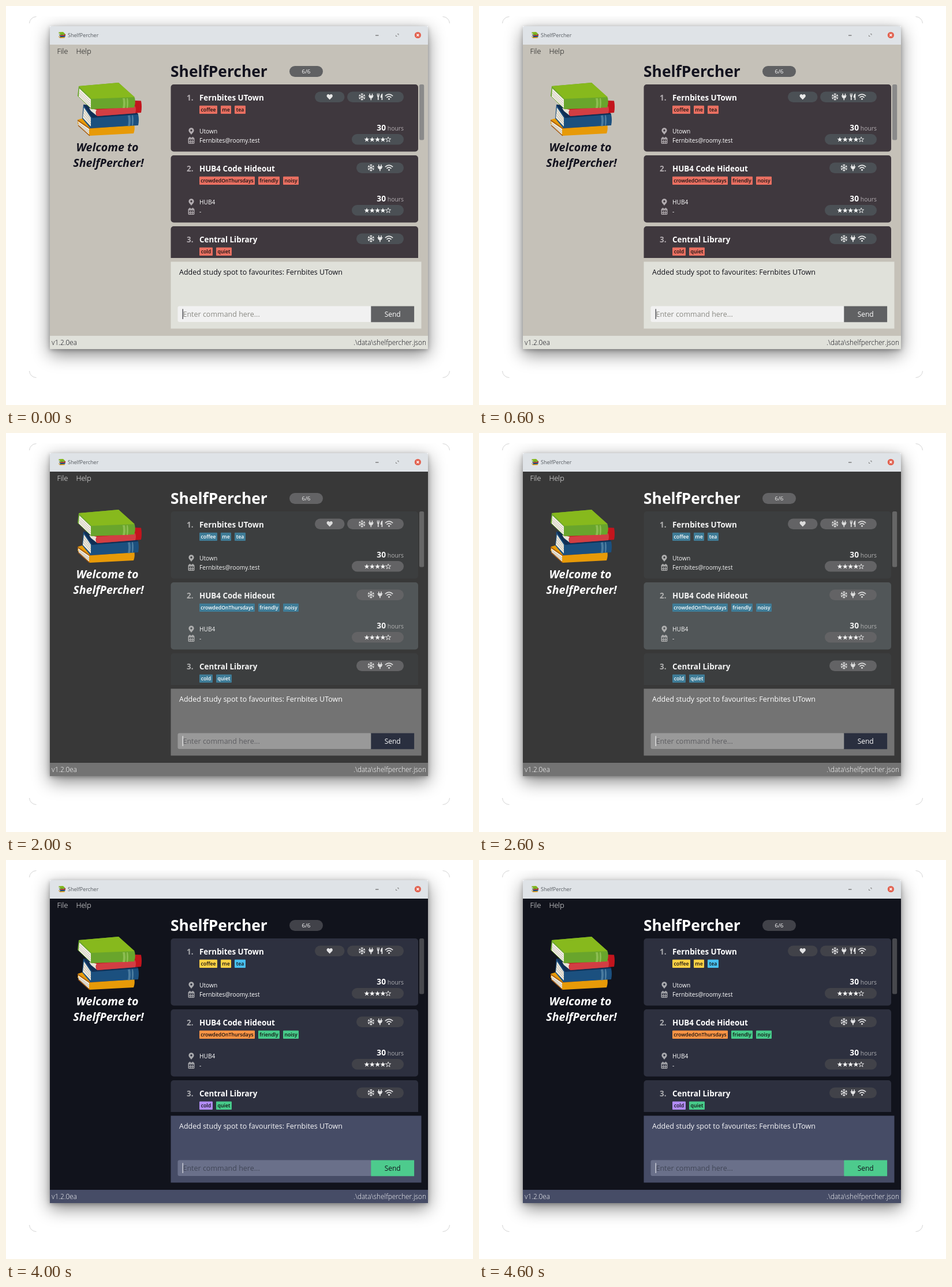
These frames come from a looping animation (809x692 px, 5 s). An HTML page:

```html
<!DOCTYPE html>
<html lang="en">
<head>
<meta charset="utf-8">
<title>ShelfPercher themes</title>
<style>
  html, body { margin: 0; width: 100%; height: 100%; overflow: hidden; background: #fff; }
  #backdrop { position: absolute; left: 40px; top: 18px; width: 729px; height: 627px; border-radius: 12px; overflow: hidden; }
  #shadow { position: absolute; left: 36px; top: 17px; width: 655px; height: 560px;
    box-shadow: 0 9px 28px rgba(0,0,0,.48), 0 2px 7px rgba(0,0,0,.26); }
  svg { position: absolute; left: 0; top: 0; display: block; }
  text { font-family: "Open Sans", "Noto Sans", sans-serif; white-space: pre; }
</style>
</head>
<body>
<div id="backdrop"><div id="shadow"></div></div>
<svg id="stage" width="809" height="692" viewBox="0 0 809 692">
  <defs>
    <clipPath id="listClip"><rect x="280" y="130" width="440" height="307"/></clipPath>
    <g id="books">
      <path d="M125 197L136 194L222 205Q224 213 221 221L145 225L124 204Z" fill="#e79a08"/>
      <path d="M125 200L144 213V223L126 208Z" fill="#eee9dc"/>
      <path d="M126 204l18 13M126 207l18 13" stroke="#a9a398" stroke-width=".8"/>
      <path d="M124 198L144 212L222 206M145 225L125 207" fill="none" stroke="#a55b13" stroke-width="1.6"/>
      <path d="M134 171L224 181L229 188Q231 198 229 207L146 212L132 195Z" fill="#1b507f"/>
      <path d="M134 171L224 181L229 188L149 194Z" fill="#112f55"/>
      <path d="M211 190l4-.4q2 9 0 18.6l-4 .3q2-9 0-18.5ZM218 189.5l2-.2q2 9 0 18.3l-2 .2Z" fill="#4a7b9f"/>
      <path d="M135 176L147 194V209L133 194Z" fill="#efebdf"/>
      <path d="M135 181l12 16M134 185l13 16M134 190l13 15" stroke="#aaa59a" stroke-width=".8"/>
      <path d="M146 172L222 164L234 164.5Q236 175 234 185L158 191L146 178Z" fill="#c3151d"/>
      <path d="M157 180L224 174Q226 180 224 186L158 191Q155 186 157 180Z" fill="#d23e43"/>
      <path d="M144 177L157 180Q154 185 157 190L147 182Z" fill="#e9e4d8"/>
      <path d="M126 139L195 133L223 159Q225 168 222 176L148 179L124 156Z" fill="#69a52c"/>
      <path d="M126 139L195 133L223 158L148 161Z" fill="#87b91d"/>
      <path d="M127 143L147 162V177L126 157Z" fill="#f3efe5"/>
      <path d="M128 148l18 17M127 151l19 18M127 154l19 19" stroke="#b2aea2" stroke-width=".8"/>
      <path d="M202 160l4 0q2 9 0 17l-4 0q2-9 0-17ZM209 160l2 0q2 8 0 17l-2 0Z" fill="#8cbd51"/>
    </g>
    <g id="snow" fill="none" stroke="currentColor" stroke-width="1.2" stroke-linecap="round">
      <g id="arm"><path d="M0-5.4V5.4M-1.4-5L0-3.7L1.4-5M-1.4 5L0 3.7L1.4 5"/></g>
      <use href="#arm" transform="rotate(60)"/><use href="#arm" transform="rotate(120)"/>
    </g>
    <path id="plug" fill="currentColor" d="M-2.9-5.6h1.5v3h2.8v-3h1.5v3H4.3v1.4H3.7Q3.7 2 .8 2.8V5.8H-.8V2.8Q-3.7 2-3.7-1.2H-4.3V-2.6H-2.9Z"/>
    <path id="fork" fill="currentColor" d="M-5.2-5.7h.9v3.2h.7v-3.2h1v3.2h.7v-3.2h.9Q-.7-.7-2.2.2V5.6H-4V.2Q-5.5-.7-5.2-5.7ZM4.4-5.7V5.6H2.6V1.6H.8Q1-5 4.4-5.7Z"/>
    <g id="wifi" fill="none" stroke="currentColor" stroke-width="1.6">
      <path d="M-6.7-1.4Q0-7.4 6.7-1.4M-4 1.3Q0-2.5 4 1.3"/>
      <circle cy="3.7" r="1.5" fill="currentColor" stroke="none"/>
    </g>
    <path id="heart" fill="currentColor" d="M0 4.9L-4.6.2Q-6-2-4.4-3.8Q-2-5.6 0-3.1Q2-5.6 4.4-3.8Q6-2 4.6.2Z"/>
    <path id="pin" fill="currentColor" fill-rule="evenodd" d="M0 6.2C-1.6 3.6-4.6 1.6-4.6-1.2A4.6 4.6 0 0 1 4.6-1.2C4.6 1.6 1.6 3.6 0 6.2ZM0-2.9a1.7 1.7 0 1 0 .01 0Z"/>
    <g id="calendar" stroke="currentColor" fill="none">
      <rect x="-4.7" y="-4" width="9.4" height="9.4" rx=".8" stroke-width="1.4"/>
      <path d="M-5-2.7H5M-2.5-6v2M2.5-6v2" stroke-width="1.8"/>
      <path d="M-4.7 2.3H4.7M-1.6-1V5.4M1.6-1V5.4" stroke-width="1.3"/>
    </g>
    <path id="star" d="M0-4.7L1.1-1.5H4.5L1.8.6L2.8 3.8L0 1.9L-2.8 3.8L-1.8.6L-4.5-1.5H-1.1Z"/>
  </defs>
  <path d="M40.5 30a12 12 0 0 1 12-11.5M756.5 18.5a12 12 0 0 1 12 11.5M768.5 633a12 12 0 0 1-12 11.5M52.5 644.5a12 12 0 0 1-12-11.5" fill="none" stroke="#cfcfcf" stroke-width=".9"/>
  <path d="M76 67V38q0-3 3-3H728q3 0 3 3V67Z" fill="#dfe3e7"/>
  <g id="window"></g>
</svg>
<script>
const spots = [
  { name: "Fernbites UTown", tags: [["coffee", 31], ["me", 18], ["tea", 19]], place: "Utown",
    contact: "Fernbites@roomy.test", icons: ["snow", "plug", "fork", "wifi"], liked: true },
  { name: "HUB4 Code Hideout", tags: [["crowdedOnThursdays", 96], ["friendly", 37], ["noisy", 27]], place: "HUB4",
    contact: "-", icons: ["snow", "plug", "wifi"] },
  { name: "Central Library", tags: [["cold", 23], ["quiet", 27]], place: "Library",
    contact: "-", icons: ["snow", "plug", "wifi"] }
];

// Tag colours: [food, drink, crowd, mood, climate]
const vivid = ["#ffd045", "#48bfef", "#ff9445", "#46c989", "#b08bf5"];
const pastel = ["#cf9f9f", "#b38ce3", "#fbf3a0", "#71e5d0", "#5bcbe8"];
const tagKind = { coffee: 0, me: 0, tea: 1, crowdedOnThursdays: 2, friendly: 3, noisy: 3, quiet: 3, cold: 4 };

const themes = [
  { bg: "#c5c1b8", ink: "#12121e", menu: "#0c0c0c", card: "#3f383e", cardInk: "#fff", dim: "#b3adb1", icon: "#e8e8e8",
    count: "#606163", countInk: "#fff", pill: "#4b5055", tags: Array(5).fill("#e86f61"), tagInk: "#111",
    panel: "#e0e1da", panelInk: "#0e0e16", input: "#f1f1f1", hint: "#8a8a84", send: "#606163", sendInk: "#fff", bar: "#8a8a8a" },
  { dx: -1, bg: "#e7e8ee", ink: "#12121e", menu: "#0c0c0c", card: "#b9bccb", cardInk: "#14141e", dim: "#555864", icon: "#2b2d38",
    count: "#c8ccd8", countInk: "#14141e", pill: "#c3c5d1", tags: vivid, tagInk: "#111",
    panel: "#fafafa", panelInk: "#0e0e16", input: "#fdfdfd", hint: "#a3aac2", send: "#ff9445", sendInk: "#14141e", bar: "#9aa5c9" },
  { bg: "#383838", ink: "#fff", menu: "#fff", card: "#3c3e3f", altCard: "#515658", cardInk: "#f4f4f4", dim: "#b0b0b0", icon: "#dcdcdc",
    count: "#636365", countInk: "#eee", pill: "#636365", tags: Array(5).fill("#3f7c97"), tagInk: "#fff",
    panel: "#737373", panelInk: "#fff", input: "#999", hint: "#5e5e62", send: "#2a2f3f", sendInk: "#fff", bar: "#666" },
  { bg: "#e3e8f2", ink: "#16283c", menu: "#0c0c0c", card: "#bbc4de", cardInk: "#1a2537", dim: "#5a6478", icon: "#364052",
    count: "#cbd5e3", countInk: "#1a2537", pill: "#c5cde0", tags: pastel, tagInk: "#111",
    panel: "#fafcff", panelInk: "#141a24", input: "#fdfeff", hint: "#9aa7c8", send: "#71e5d0", sendInk: "#16283c", bar: "#98a6cc" },
  { bg: "#11131c", ink: "#fff", menu: "#fff", card: "#2d303f", cardInk: "#fff", dim: "#aaabaf", icon: "#e2e2e4",
    count: "#414249", countInk: "#fff", pill: "#414249", tags: vivid, tagInk: "#111",
    panel: "#464c66", panelInk: "#f8f8fa", input: "#6a708a", hint: "#414657", send: "#4dcb8d", sendInk: "#11131c", bar: "#47484d" }
];

const rect = (x, y, w, h, fill, r = 0) => `<rect x="${x}" y="${y}" width="${w}" height="${h}" rx="${r}" fill="${fill}"/>`;
const text = (x, y, size, fill, str, extra = "") => `<text x="${x}" y="${y}" font-size="${size}" fill="${fill}" ${extra}>${str}</text>`;
const icon = (id, x, y, color) => `<use href="#${id}" x="${x}" y="${y}" color="${color}"/>`;
const bold = ' font-weight="700"', semibold = ' font-weight="600"', light = ' font-weight="300"', italic = ' font-style="italic"';
const middle = ' text-anchor="middle"', end = ' text-anchor="end"';

function stars(x, y, color) {
  return [0, 1, 2, 3, 4].map(i => {
    const paint = i < 4 ? `fill="${color}"` : `fill="none" stroke="${color}" stroke-width=".8"`;
    return `<use href="#star" x="${x + i * 9.3}" y="${y}" ${paint}/>`;
  }).join("");
}

function card(spot, i, t) {
  const top = 136 + i * 123;
  let out = rect(285.5, top, 428.5, 116.5, i === 1 && t.altCard || t.card, 5);
  out += text(313, top + 28, 13.4, t.dim, `${i + 1}.`, bold);
  out += text(335, top + 28, 13.4, t.cardInk, spot.name, bold);

  let x = 335;
  for (const [label, width] of spot.tags) {
    out += rect(x, top + 36.7, width, 14.4, t.tags[tagKind[label]], 1);
    out += text(x + width / 2, top + 47.2, 8.7, t.tagInk, label, middle + semibold);
    x += width + 6;
  }

  out += icon("pin", 321, top + 81, t.dim) + icon("calendar", 321, top + 97, t.dim);
  out += text(335, top + 84.5, 10.2, t.cardInk, spot.place) + text(335, top + 101.3, 10.2, t.cardInk, spot.contact);

  if (spot.liked) out += rect(535, top + 12.5, 51.5, 18.5, t.pill, 9.2) + icon("heart", 560.7, top + 21.5, t.icon);
  const n = spot.icons.length, left = 655 - n * 16;
  out += rect(left, top + 12.5, 689 - left, 18.5, t.pill, 9.2);
  spot.icons.forEach((id, k) => out += icon(id, 663.5 - (n - 1 - k) * 15.6, top + 21.5, t.icon));

  out += text(658, top + 80, 13.7, t.cardInk, "30", bold + end) + text(689, top + 80, 10.4, t.dim, "hours", end);
  return out + rect(599, top + 86, 90, 18.5, t.pill, 9.2) + stars(625, top + 95.7, t.cardInk);
}

function titleBar() {
  return `<use href="#books" transform="translate(91 45) scale(.108 .118) translate(-123 -133)"/>`
    + text(107, 53.7, 9, "#555a60", "ShelfPercher")
    + `<path d="M640 51H645.5" stroke="#666" stroke-width="1.2"/>
       <path d="M675.5 50.5v2h2M678 48.5h2v2" fill="none" stroke="#777" stroke-width=".9"/>
       <circle cx="713.4" cy="50.5" r="5.6" fill="#e2614f"/>
       <path d="M711.4 48.5l4 4m0-4l-4 4" stroke="#fff" stroke-width="1.3"/>`;
}

function draw(t) {
  const body = [
    rect(76, 67, 655, 528, t.bg),
    titleBar(),
    text(88.5, 83, 12.5, t.menu, "File", light),
    text(121.5, 83, 12.5, t.menu, "Help", light),
    '<use href="#books"/>',
    text(175.5, 252, 19.6, t.ink, "Welcome to", bold + middle + italic),
    text(177.5, 279, 19.6, t.ink, "ShelfPercher!", bold + middle + italic),
    text(285, 122.5, 26.4, t.ink, "ShelfPercher", bold),
    rect(491, 104, 58, 19, t.count, 9.5),
    text(520, 117, 9.8, t.countInk, "6/6", middle),
    `<g clip-path="url(#listClip)">${spots.map((s, i) => card(s, i, t)).join("")}</g>`,
    rect(716, 136, 8.2, 96.5, t.bar, 2.5),
    rect(285.5, 443.5, 434, 116, t.panel),
    text(300, 466, 12.5, t.panelInk, "Added study spot to favourites: Fernbites UTown"),
    rect(297.5, 520.5, 336, 27.5, t.input, 3),
    rect(305.7, 525.5, 1, 17.5, t.panelInk),
    text(306.5, 539, 12.5, t.hint, "Enter command here..."),
    rect(632.3, 520.6, 74.8, 27.7, t.send),
    text(669.7, 539, 12, t.sendInk, "Send", middle),
    rect(76, 572, 655, 23, t.panel),
    text(79, 588, 11.8, t.panelInk, "v1.2.0ea", light),
    text(728, 588, 11.8, t.panelInk, ".\\data\\shelfpercher.json", light + end)
  ];
  return `<g transform="translate(${t.dx || 0} 0)">${body.join("")}</g>`;
}

const windowGroup = document.getElementById("window");
const start = performance.now();
let shown = -1;

function tick() {
  const current = Math.floor((performance.now() - start) / 1000) % themes.length;
  if (current !== shown) {
    windowGroup.innerHTML = draw(themes[current]);
    shown = current;
  }
  requestAnimationFrame(tick);
}
tick();
</script>
</body>
</html>
```
